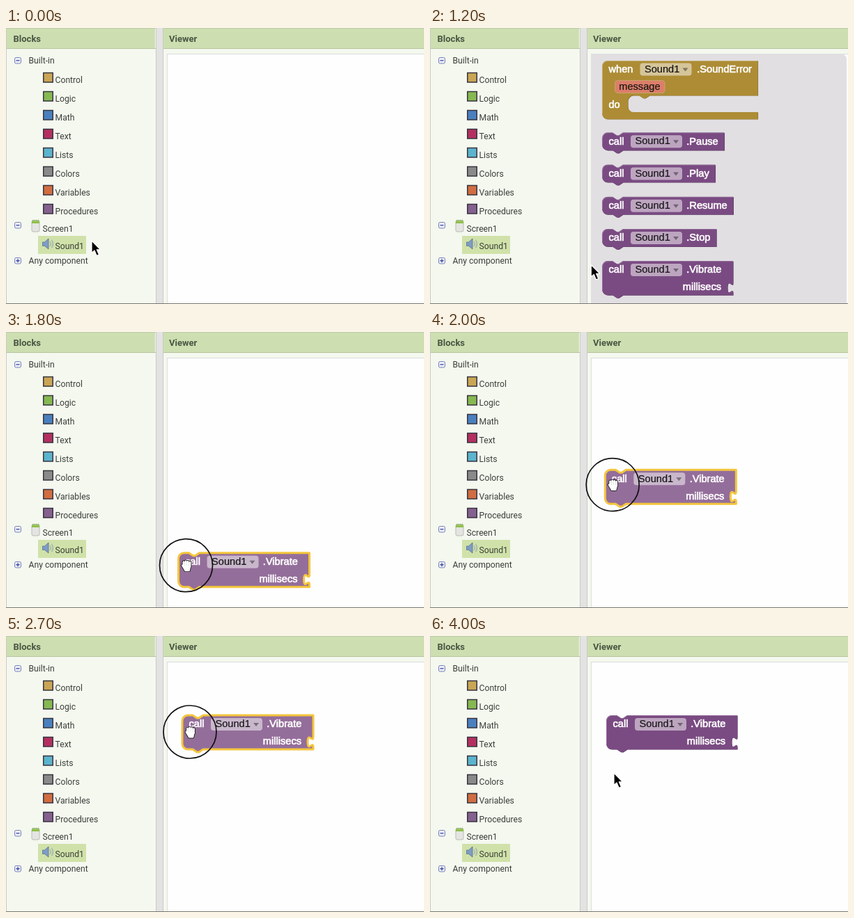
An HTML page that plays this animation: 600x397 px, repeating every 4.1 s.

```html
<!DOCTYPE html>
<html lang="en">
<head>
<meta charset="utf-8">
<title>Dragging a block</title>
<style>
  html, body { margin: 0; width: 100%; height: 100%; overflow: hidden; background: #f4f8ef; }
  svg { display: block; width: 600px; height: 397px; }
  .ui { font: 12.2px Roboto, sans-serif; fill: #3c3f3a; }
  .head { font: 700 13px Roboto, sans-serif; fill: #4a5643; }
  .blk, .fld { font: 14.6px "Liberation Sans", Arial, sans-serif; }
  .blk { fill: #fff; stroke: #fff; stroke-width: .65; }
  .fld { fill: #161616; stroke: #161616; stroke-width: .2; }
</style>
</head>
<body>
<svg viewBox="0 0 600 397">
  <rect width="600" height="397" fill="#f4f8ef"/>
  <rect x="215" width="10" height="397" fill="#e3e3e3"/>
  <path d="M215.5 0V397M225.5 0V397M.5 0V397" stroke="#c9cbc6"/>
  <path d="M1 0H214V29H1zM226 0H600V29H226z" fill="#cddfb1"/>
  <path d="M1 29.5H215M226 29.5H600" stroke="#b5c39c"/>
  <path d="M1 .5H215M226 .5H600" stroke="#bfccaa"/>
  <text class="head" x="10.5" y="20">Blocks</text>
  <text class="head" x="234" y="20">Viewer</text>
  <rect x="231.5" y="37.5" width="380" height="380" fill="#fefeff" stroke="#dcdedb"/>
  <g id="tree"></g>
  <g id="flyout"></g>
  <g id="drag"></g>
  <path d="M0 396.5H600" stroke="#77796f"/>
  <circle id="ring" fill="none" stroke="#111" stroke-width="1.7"/>
  <g id="pointer" stroke-linejoin="round" stroke-linecap="round">
    <path id="arrow" d="M0-3V14.500L4 11 7.200 18.500 10.500 17 7.300 9.800H12.500z" stroke="#fff" stroke-width="1.2"/>
    <g id="open"></g>
    <g id="fist"></g>
  </g>
</svg>
<script>
const $ = id => document.getElementById(id);
const PURPLE = '#7a4b82', GOLD = '#ad8c35';
const text = (cls, x, y, s, anchor = 'start') =>
  `<text class="${cls}" x="${x}" y="${y}" text-anchor="${anchor}">${s}</text>`;

// component tree
const toggle = (y, plus) => `<rect x="12.500" y="${y + .5}" width="9" height="8.500" rx="2" fill="#eceffb" stroke="#7680b5"/>
  <path d="M14.500 ${y + 4.75}h5${plus ? 'm-2.500-2.500v5' : ''}" stroke="#3f4a98" stroke-width="1.300"/>`;
const drawers = {
  Control: '#c9a554', Logic: '#86b952', Math: '#4a80be', Text: '#b3305f',
  Lists: '#5cb4cd', Colors: '#8a8a8a', Variables: '#d06d42', Procedures: '#84618e'
};
$('tree').innerHTML =
  toggle(42) + text('ui', 32.5, 51, 'Built-in') +
  Object.entries(drawers).map(([name, color], i) =>
    `<rect x="53.750" y="${64.5 + i * 27}" width="13.500" height="13.500" fill="${color}" stroke="#39343f" stroke-width="1.500"/>` +
    text('ui', 70.5, 79.4 + i * 27, name)).join('') +
  toggle(279) + text('ui', 52.5, 292.5, 'Screen1') +
  `<rect x="37" y="277" width="11" height="16" rx="2" fill="#e4e5e2" stroke="#b9bbb5"/>
   <path d="M37 281v-3.500h11v3.500z" fill="#8fc04a"/><path d="M38 276.500h10" stroke="#6e9d35" stroke-dasharray="1.500 1"/>
   <rect x="46" y="299" width="69" height="26" fill="#d0e2a9"/>
   <path d="M52.500 308h3l5.500-5v15l-5.500-4.500h-3z" fill="#7f9cc4" stroke="#5c7194" stroke-width=".8"/>
   <path d="M63 307q2.500 3.500 0 7M65.500 305q4 5.500 0 11" fill="none" stroke="#9aa9b6" stroke-width="1.200"/>` +
  text('ui', 70.5, 318, 'Sound1') +
  toggle(330, true) + text('ui', 32.5, 339, 'Any component');

// blocks
const pen = document.createElement('canvas').getContext('2d');
pen.font = '14.6px "Liberation Sans", Arial, sans-serif';

const bevel = (d, color, id = '') => `<g ${id && `id="${id}"`}>
  <path d="${d}" transform="translate(.6 .6)" fill="${color}"/>
  <path d="${d}" transform="translate(.6 .6)" fill-opacity=".22"/>
  <path d="${d}" fill="${color}"/></g>`;
const field = (x, y) => `<rect x="${x}" y="${y}" width="74" height="18" rx="4" fill="#fff" fill-opacity=".5"/>` +
  text('fld', x + 6.5, y + 13.2, 'Sound1') +
  `<path d="M${x + 61} ${y + 7}h8l-4 5z" fill-opacity=".4"/>`;

function callBlock(method, arg, id) {
  const w = 130 + pen.measureText('.' + method).width + (arg ? 8 : 0), h = arg ? 49 : 25.5;
  const socket = arg ? 'V26v5c0 10-8-8-8 7.500s8-2.500 8 7.500' : '';
  const top = 'A8 8 0 0 1 8 0H15l6 4h3l6-4H' + w;
  const d = `M0 8${top}${socket}V${h}H30l-6 4h-3l-6-4H8A8 8 0 0 1 0 ${h - 8}z`;
  return bevel(d, PURPLE, id && id + 'Body') +
    `<path d="M0 ${h - 8}V8${top}" transform="translate(.5 .5)" fill="none" stroke="#fff" stroke-opacity=".2"/>` +
    (id ? `<path id="${id}Glow" d="${d}" fill="none" stroke="#f4c63c" stroke-width="3" stroke-linejoin="round"/>` : '') +
    text('blk', 9.5, 17.3, 'call') + field(41, 4) + text('blk', 121.3, 17.3, '.' + method) +
    (arg ? text('blk', 171, 42.3, arg, 'end') : '');
}

const eventPath = 'M247 55a8 8 0 0 1 8-8H470.500V97H315l-6 4h-3l-6-4h-8a8 8 0 0 0-8 8v8a8 8 0 0 0 8 8H470.500V131H255a8 8 0 0 1-8-8z';
const calls = [['Pause'], ['Play'], ['Resume'], ['Stop'], ['Vibrate', 'millisecs', 'pick']];
$('flyout').innerHTML =
  '<path d="M231 37H590a8 8 0 0 1 8 8V397H231z" fill="#e1dfe2"/>' +
  bevel(eventPath, GOLD) +
  '<path d="M247.500 123V55a7.500 7.500 0 0 1 7.500-7.500H470" fill="none" stroke="#fff" stroke-opacity=".25"/>' +
  text('blk', 256.5, 64, 'when') + field(301.5, 50.5) + text('blk', 383.3, 64, '.SoundError') +
  '<rect x="265.500" y="75.500" width="71.500" height="18" rx="4" fill="#dc7e69" stroke="#c9a36a"/>' +
  text('fld', 271.3, 89, 'message') + text('blk', 256.5, 115, 'do') +
  calls.map((c, i) => `<g transform="translate(247 ${150.3 + i * 46.2})">${callBlock(...c)}</g>`).join('');
$('drag').innerHTML = callBlock('Vibrate', 'millisecs', 'drag');

// round-capped strokes, dark below and white above
function hand(reach, thumb) {
  let d = `M-3 2H5L4 7H-1zM-2 5L-${thumb} 0`;
  for (let i = 0; i < 4; i++) d += `M${i * 3 - 3.5} 2V${Math.abs(i - 1.3) - reach}`;
  return `<path d="${d}" fill="#fff" stroke="#222" stroke-width="4.800"/><path d="${d}" fill="#fff" stroke="#fff" stroke-width="2.900"/>`;
}
$('open').innerHTML = hand(8.5, 6.5);
$('fist').innerHTML = hand(6, 5);

// motion
const ramp = (t, a, b) => Math.min(1, Math.max(0, (t - a) / (b - a)));
const smooth = (t, a, b) => { const p = ramp(t, a, b); return p * p * (3 - 2 * p); };
const easeOut = (t, a, b, power) => 1 - (1 - ramp(t, a, b)) ** power;
const within = (t, a, b) => t >= a && t < b;
const show = (id, on) => $(id).style.display = on ? '' : 'none';
const place = (id, x, y) => $(id).setAttribute('transform', `translate(${x} ${y})`);

function draw(t) {
  const reach = smooth(t, 700, 1400), settle = smooth(t, 2400, 2700), leave = smooth(t, 3100, 3700);
  const pull = easeOut(t, 1780, 2400, 2.93);
  const handPull = easeOut(t, 1780, 2400, 2.75);
  const x = 123 + 135 * reach + 6 * handPull;
  const y = 309 + 43 * reach - 189 * handPull - 25 * settle + 62 * leave;
  const held = within(t, 1500, 2900), overBlock = within(t, 1300, 3400);

  place('pointer', x, y);
  show('arrow', !overBlock);
  show('fist', held);
  show('open', overBlock && !held);

  show('ring', within(t, 300, 600) || held);
  $('ring').setAttribute('cx', x);
  $('ring').setAttribute('cy', y);
  $('ring').setAttribute('r', 38 + 11 * (ramp(t, 1500, 1600) - ramp(t, 300, 500) - ramp(t, 2800, 2900)));

  show('flyout', within(t, 400, 1800));
  show('pickGlow', t >= 1600);
  show('drag', t >= 1800);
  place('drag', 247 + 6 * pull, 335 - 189 * pull - 32 * settle);
  $('dragBody').setAttribute('opacity', held ? .8 : 1);
  show('dragGlow', t < 3500);
}

const start = performance.now();
function tick() {
  draw(Math.floor((performance.now() - start) % 4100 / 100) * 100);
  requestAnimationFrame(tick);
}
tick();
</script>
</body>
</html>
```
